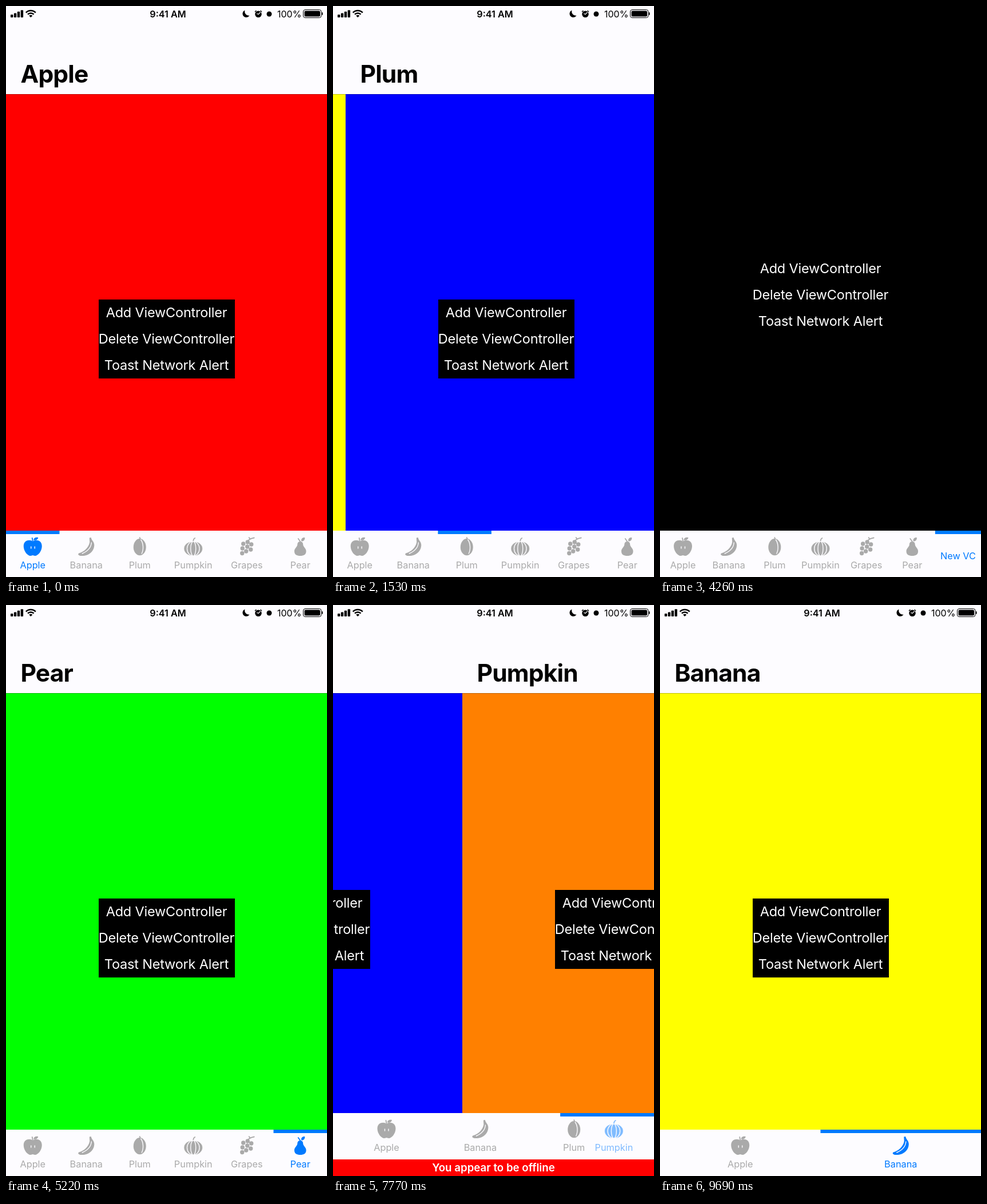
These frames come from a looping animation (561 px wide and 998 px high, 9720 ms). An HTML page with a canvas:

```html
<!DOCTYPE html>
<html lang="en">
<head>
<meta charset="utf-8">
<title>Fruit tabs</title>
<style>
html, body { margin: 0; height: 100%; overflow: hidden; }
canvas { display: block; width: 100vw; height: 100vh; }
</style>
</head>
<body>
<canvas id="stage" width="561" height="998"></canvas>
<script>
const W = 561, H = 998, LOOP = 9720;
const NAV = 154, BAR = 81, TOAST = 29;
const BLUE = '#007aff', GREY = '#aaaaaa', PAPER = '#fdfcff';
const TAB_MS = 300, PAGE_MS = 347, SWIPE_MS = 594;
const FONT = 'Inter, "Liberation Sans", sans-serif';
const c = document.getElementById('stage').getContext('2d');

const oval = (x, y, rx, ry = rx) =>
  `M${x - rx} ${y}a${rx} ${ry} 0 1 0 ${2 * rx} 0a${rx} ${ry} 0 1 0 ${-2 * rx} 0Z`;
const grapes = [[1.5, -8], [-6, -5], [8, -4], [1, 0], [-7.5, 3], [7, 5], [-1, 8], [-8, 11.5]]
  .map(([x, y]) => oval(x, y, 3.7)).join('');

// Each fruit: name, page colour, then icon paths: solid, cut-out lines, outer lines
const fruits = [
  ['Apple', '#ff0000',
    'M0-9C4-13 16-12 16-1C16 8 9 16 4 16C2 16 1 15 0 15C-1 15-2 16-4 16C-9 16-16 8-16-1C-16-12-4-13 0-9ZM1.5-11.5C1.5-15 5-17 9.5-16C9-12 5.5-10.5 1.5-11.5Z',
    'M-3 0V3M3.5 0V3', 'M0-10L-1-15'],
  ['Banana', '#ffff00',
    'M5.5-15.5L8.5-16C9-11 14-9 14-3C14 9 3 17-9 16C-13 16-15.5 13.5-13 11.5C-5 9 4 3 6-8Z',
    'M9-7C8.5 2 2 8-7 12', ''],
  ['Plum', '#0000ff', oval(0, .7, 11, 14.6), 'M2-12C6.5-6 7 5 3.5 12', 'M1-13L0-16'],
  ['Pumpkin', '#ff8000', oval(0, 3.5, 16, 12.6),
    oval(0, 3.5, 4.5, 12.6) + oval(0, 3.5, 10.8, 12.6), 'M0-9C0-12 1-14 3-15'],
  ['Grapes', '#800080', grapes, '', 'M3-11Q5-14 13-15.5M6-13L4-16'],
  ['Pear', '#00ff00',
    'M0-9C4-9 5-6 5-3C6 1 10.3 3 10.3 8C10.3 14 6 16 0 16C-6 16-10.3 14-10.3 8C-10.3 3-6 1-5-3C-5-6-4-9 0-9ZM2-9.5C1-14 4-16.5 8-16C8.5-12 6-9 2-9.5Z',
    '', 'M0-9L-3.5-14']
].map(([name, color, ...paths]) => ({ name, color, paths: paths.map(p => new Path2D(p)) }));

// Time, tab count, page shown, swiped by finger
const steps = [
  [-2000, 6, 0], [330, 6, 1, true], [1080, 6, 2, true], [2000, 7, 2], [2585, 8, 2],
  [3250, 8, 7], [3800, 7, 6], [4450, 6, 5], [6805, 5, 4], [7130, 4, 3], [7620, 3, 2], [8660, 2, 1]
];
const TOAST_ON = 5200, TOAST_OFF = 8150;

const clamp = v => Math.max(0, Math.min(1, v));
const lerp = (a, b, p) => a + (b - a) * p;
const ease = v => (v = clamp(v), v * v * (3 - 2 * v));
const flick = v => 1 - (1 - clamp(v) ** 1.5) ** 3;

function rect(x, y, w, h, color) {
  c.fillStyle = color;
  c.fillRect(x, y, w, h);
}

function text(str, x, y, size, color, weight = 400, align = 'center', spacing = 0) {
  c.font = `${weight} ${size}px ${FONT}`;
  c.letterSpacing = spacing + 'px';
  c.textAlign = align;
  c.fillStyle = color;
  c.fillText(str, x, y);
}

function drawPage(i, x, bottom) {
  const fruit = fruits[i], top = fruit ? NAV : 0;
  rect(x, 0, W, bottom, fruit ? fruit.color : '#000');
  if (fruit) {
    rect(x, 0, W, NAV, PAPER);
    rect(x, NAV, W, 1, 'rgba(0,0,0,.25)');
    text(fruit.name, x + 25.5, 134, 42.5, '#000', 700, 'left', -.85);
  }
  const y = Math.round((top + bottom) / 2 - 23);
  rect(x + 162, y, 238, 138, '#000');
  ['Add ViewController', 'Delete ViewController', 'Toast Network Alert'].forEach((s, k) =>
    text(s, x + 280.5, y + 31 + 46 * k, 23.5, '#fff', 400, 'center', -.2));
}

function drawTab(i, x, top, color, alpha = 1) {
  const fruit = fruits[i];
  c.globalAlpha = alpha;
  text(fruit ? fruit.name : 'New VC', x, top + (fruit ? 66 : 50), 16.3, color);
  if (fruit) {
    const [solid, cut, line] = fruit.paths;
    c.save();
    c.translate(x, top + 28);
    c.lineCap = 'round';
    c.fillStyle = c.strokeStyle = color;
    c.fill(solid);
    c.lineWidth = 1.8;
    c.stroke(line);
    c.globalAlpha = 1;
    c.strokeStyle = PAPER;
    c.lineWidth = 1.4;
    c.stroke(cut);
    c.restore();
  }
  c.globalAlpha = 1;
}

function arc(x, y, r, from = 0, to = 2 * Math.PI) {
  c.beginPath();
  c.arc(x, y, r, from, to);
}

function drawStatus() {
  c.fillStyle = c.strokeStyle = '#000';
  for (let k = 0; k < 4; k++) {
    c.beginPath();
    c.roundRect(8 + 5.9 * k, 15 - 2.6 * k, 4.4, 5 + 2.6 * k, 1);
    c.fill();
  }
  c.lineCap = 'butt';
  c.lineWidth = 2.5;
  for (const r of [7.5, 12]) {
    arc(43.3, 20, r, -Math.PI * .75, -Math.PI * .25);
    c.stroke();
  }
  c.beginPath();
  c.moveTo(43.3, 20);
  c.arc(43.3, 20, 4.2, -Math.PI * .75, -Math.PI * .25);
  c.fill();
  text('9:41 AM', 283, 20, 16.2, '#000', 600);
  c.fill(new Path2D('M417.5 7.5A6.4 6.4 0 1 0 425.5 16.5A7 7 0 0 1 417.5 7.5Z'));
  // Clock with its hands left open
  c.fill(new Path2D(oval(441, 14.3, 5.8) + 'M444 10.5L441 13.7L438.5 12.7L438 13.8L441.3 15.2L445 11.3Z'), 'evenodd');
  c.lineWidth = 1.5;
  c.stroke(new Path2D('M435 10.2L437.5 8M447 10.2L444.5 8'));
  arc(460, 14, 4.5);
  c.fill();
  text('100%', 474, 20, 16, '#000', 400, 'left');
  c.lineWidth = 1;
  c.beginPath();
  c.roundRect(519.5, 6.5, 31.5, 14, 3.5);
  c.stroke();
  c.beginPath();
  c.roundRect(521.5, 8.5, 27.5, 10, 2);
  c.roundRect(552, 11, 1.6, 5, .8);
  c.fill();
}

function draw(now) {
  const t = now % LOOP;
  const n = steps.findLastIndex(s => s[0] <= t);
  const [at, tabs, page, swiped] = steps[n];
  const [, oldTabs, oldPage] = steps[Math.max(0, n - 1)];
  const age = t - at;
  const slide = swiped ? flick(age / SWIPE_MS) : ease(age / PAGE_MS);
  const shift = swiped ? slide : ease(age / TAB_MS);
  const toast = ease((t - TOAST_ON) / 300) - ease((t - TOAST_OFF) / 300);
  const top = Math.round(H - BAR - TOAST * toast);

  const dir = Math.sign(page - oldPage);
  const x = Math.round(dir * (1 - slide) * W);
  if (x) drawPage(oldPage, x - dir * W, top);
  drawPage(page, x, top);
  drawStatus();

  rect(0, top, W, H - top, PAPER);
  const oldW = W / oldTabs, newW = W / tabs, cell = lerp(oldW, newW, shift);
  rect(lerp(oldPage * oldW, page * newW, shift), top, cell, 6, BLUE);

  // A moving page keeps its old highlight only while a tab is being removed
  const lit = slide === 1 || !dir ? page : tabs < oldTabs ? oldPage : -1;
  for (let i = 0; i < Math.max(tabs, oldTabs); i++) {
    const color = i === lit ? BLUE : GREY;
    if (i >= tabs) {
      if (shift < 1) drawTab(i, (i + .5) * oldW, top, color, 1 - shift);
    } else if (i >= oldTabs) drawTab(i, (i + .5) * newW, top, color, shift);
    else drawTab(i, i * cell + newW / 2, top, color);
  }

  if (toast > 0) {
    rect(0, top + BAR, W, TOAST, '#ff0000');
    text('You appear to be offline', W / 2, top + BAR + 21, 18.7, '#fff', 600);
  }
}

const start = performance.now();
function tick() {
  draw(performance.now() - start);
  requestAnimationFrame(tick);
}
tick();
</script>
</body>
</html>
```
